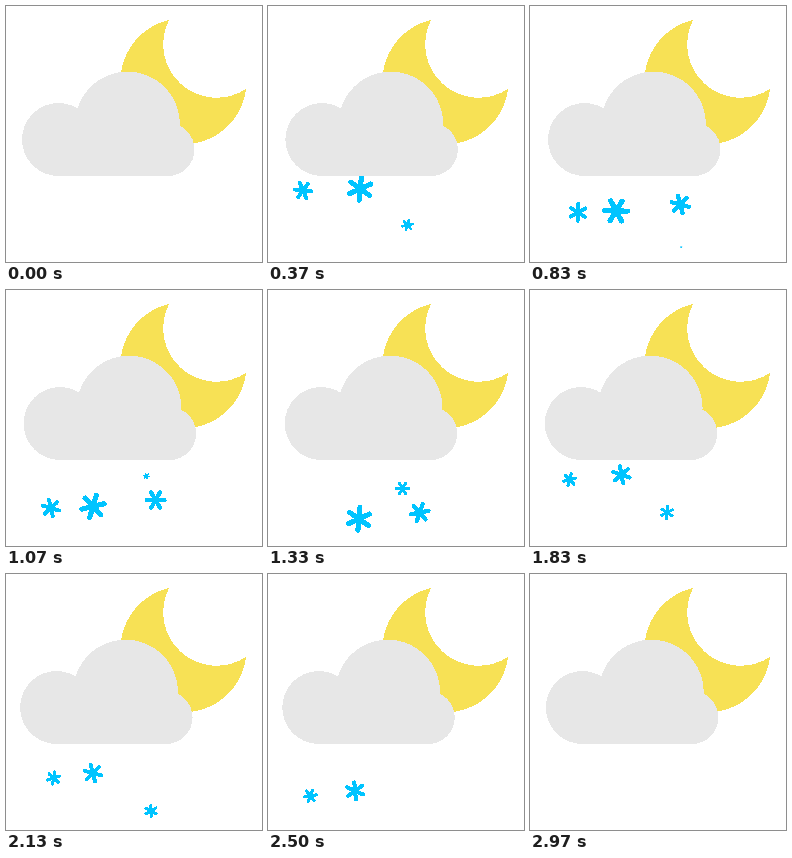
Recreate the animation shown at these times as an HTML page. Size 256 by 256 pixels, loop 3.01 s.

```html
<!DOCTYPE html>
<html lang="en">
<head>
<meta charset="utf-8">
<title>Snowy night</title>
<style>
  html, body { margin: 0; width: 100%; height: 100%; overflow: hidden; background: #fff; }
  svg { display: block; width: 100vw; height: 100vh; shape-rendering: crispEdges; }
  #snow { stroke: #00c4ff; stroke-linecap: round; }
</style>
</head>
<body>
<svg viewBox="0 0 256 256">
  <path fill="#f7e155" d="M163 14A63 63 0 1 0 240 83A53.5 53.5 0 0 1 163 14Z"/>
  <g id="snow"></g>
  <g id="cloud" fill="#e7e7e7">
    <circle cx="52.5" cy="133.5" r="36.5"/>
    <circle cx="121.5" cy="118" r="52.3"/>
    <circle cx="162" cy="143.5" r="26.5"/>
    <path d="M52.5 110H162V170H52.5Z"/>
  </g>
</svg>
<script>
const LOOP = 3010, LIFE = 1200, POP = 100;
const FALL = .048, SPIN = .187;
const TURN = 207.5, WAVE = .065; // height where the sway reverses, radians per pixel

const snow = document.getElementById("snow");
const cloud = document.getElementById("cloud");
const clamp = v => Math.max(0, Math.min(1, v));

// x is the position at the turning height, y the height at birth.
function flake(born, x, y, sway, r, tilt) {
  const el = document.createElementNS("http://www.w3.org/2000/svg", "path");
  el.setAttribute("d", "M0-.84V.84M-.73-.42L.73.42M-.73.42L.73-.42");
  snow.append(el);
  return { el, born, x, y, sway, r, tilt };
}

const flakes = [
  flake(-360, 137, 184, 9, 6.3, 1),
  flake(50, 48, 169, -14, 10, -24),
  flake(250, 86, 177, 6, 13.5, -17),
  flake(611, 149.5, 188, 5, 10.7, 4),
  flake(1028, 133, 184, 9, 7.2, -27),
  flake(1400, 48, 169, -14, 7.4, -5),
  flake(1670, 86, 177, 6, 10.2, -41)
];

function place(f, t) {
  const age = t - f.born;
  const size = f.r * clamp(Math.min(age, t, LIFE - age) / POP);
  f.el.style.display = size > .1 ? "" : "none";
  if (size <= .1) return;
  const y = f.y + age * FALL;
  const x = f.x + f.sway * (1 - Math.cos(WAVE * (y - TURN)));
  f.el.setAttribute("stroke-width", .34 + .6 / size);
  f.el.setAttribute("transform",
    `translate(${x} ${y}) rotate(${f.tilt + age * SPIN}) scale(${size})`);
}

function draw() {
  const t = performance.now() % LOOP;
  const sway = 2 * Math.sin(2 * Math.PI * t / LOOP);
  cloud.setAttribute("transform", `translate(${sway} 0)`);
  flakes.forEach(f => place(f, t));
  requestAnimationFrame(draw);
}
draw();
</script>
</body>
</html>
```
